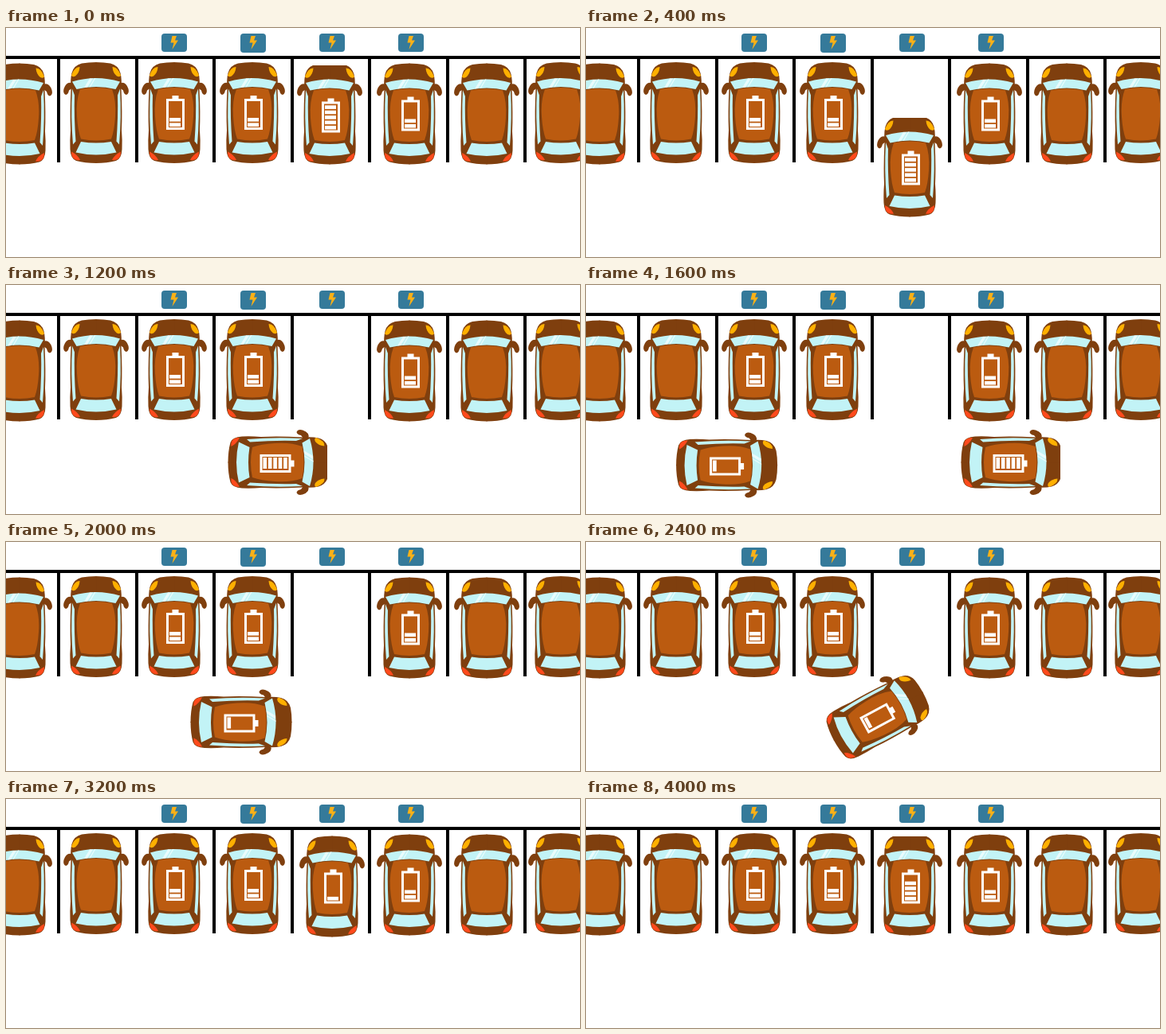
An HTML page with a canvas for the animation above (4.2 s loop, 720x288 px).

```html
<!DOCTYPE html>
<html lang="en">
<head>
<meta charset="utf-8">
<title>Charging bay</title>
<style>
html, body { margin: 0; width: 100%; height: 100%; overflow: hidden; background: #fff; }
canvas { display: block; }
</style>
</head>
<body>
<canvas id="stage" width="720" height="288"></canvas>
<script>
const ctx = document.getElementById('stage').getContext('2d');
const STEP = 200, STEPS = 21;
const DARK = '#7f3f0e', ROOF = '#bb5b10', GLASS = '#c2f3f6';
const path = d => new Path2D(d);

// Car parts around the car's centre, front pointing up
const roof = path('M-20-29.5Q0-33.5 20-29.5Q25.5-15 24 5Q23 22 19 33Q0 37-19 33Q-23 22-24 5Q-25.5-15-20-29.5Z');
const windscreen = path('M-30-39Q0-48 30-39L24.5-29.5Q0-35.5-24.5-29.5Z');
const rearWindow = path('M-19 36.5Q0 39.5 19 36.5L25.5 50Q0 56-25.5 50Z');
const glare = path('M-15-31.5L-8-43H-4L-11-32ZM-8.5-32.3L-2-43.5H-.5L-7-32.5Z');

// Drawn on the right, then mirrored to the left
const sideParts = [
  [DARK, path('M-.5-63.5Q10-63.5 18-62Q28-59.5 30.5-50Q32.5-42 31.5-30Q33 0 32 22Q33 34 32.5 46Q32 58 25 60.5Q14 63.5-.5 63.5Z')],
  [DARK, path('M30-37Q37-40 40.5-30Q42-24 38-22.5Q35-23 34-28L30-31Z')],
  [GLASS, path('M30-30Q32 5 29 40L25.5 36Q27.8 5 27-22Z')],
  ['#ffb000', path('M20.5-57.5Q27-58 31-47Q30-44 26-46Q21-50 20.5-57.5Z')],
  ['#ff4a1c', path('M31 49Q31 57 26 59Q23 60 20 59.5Q23 53 31 49Z')]
];
const bolt = path('M-2.5-8.5H3L1-3H5L-2.5 8.5L-.5 0H-4.5Z');

function fill(color, shape) {
  ctx.fillStyle = color;
  ctx.fill(shape);
}

function battery(bars) {
  ctx.strokeStyle = ctx.fillStyle = '#fff';
  ctx.lineWidth = 3;
  ctx.strokeRect(-10, -16, 20, 36);
  ctx.fillRect(-4, -21.5, 8, 4.5);
  for (let i = 0; i < bars; i++) ctx.fillRect(-7.5, 12.9 - 6.4 * i, 14, 4.6);
}

function car([x, y, angle], bars = 0, flat = false) {
  ctx.save();
  ctx.translate(x, y);
  ctx.rotate(angle * Math.PI / 180);
  if (flat) {
    ctx.beginPath();
    ctx.rect(-50, -61, 100, 130);
    ctx.clip();
  }
  for (const [color, shape] of sideParts) {
    for (const side of [1, -1]) {
      ctx.save();
      ctx.scale(side, 1);
      fill(color, shape);
      ctx.restore();
    }
  }
  fill(GLASS, windscreen);
  fill(GLASS, rearWindow);
  fill('#e9fcfd', glare);
  fill(ROOF, roof);
  if (bars) {
    ctx.translate(1.5, flat ? 2 : 0);
    battery(bars);
  }
  ctx.restore();
}

// Key poses: step, [x, y, angle], power easing of each on the way there
const TURN = [2, 0.4, 1];
const leaving = [
  [0, [406, 108, 0]],
  [2, [406, 174, 0], [1, 1.8, 1]],
  [4, [384, 203, 45], TURN],
  [6, [342, 223, 90], TURN],
  [7, [421, 223, 90]],
  [9, [647, 223, 90]]
];
const arriving = [
  [7, [63, 226.5, 90]],
  [10, [295, 226.5, 90], [0.65, 1, 1]],
  [14, [400, 197.5, 15], [0.55, 2, 1.4]],
  [16, [409, 110, 0], [0.1, 1, 0.1]],
  [17, [409, 110, 0]]
];

function pose(keys, step) {
  const next = Math.max(1, keys.findIndex(([at]) => at >= step));
  const [from, a] = keys[next - 1];
  const [to, b, ease = [1, 1, 1]] = keys[next];
  const p = (step - from) / (to - from);
  return a.map((v, i) => v + (b[i] - v) * p ** ease[i]);
}

function bays() {
  ctx.fillStyle = '#000';
  ctx.fillRect(0, 35, 720, 4);
  for (let i = 0; i < 7; i++) ctx.fillRect(Math.round(64 + 97.5 * i), 35, 4, 134);
  for (let i = 0; i < 4; i++) {
    ctx.save();
    ctx.translate(211 + 99 * i, 18.5);
    ctx.beginPath();
    ctx.roundRect(-16, -11.5, 32, i === 1 ? 24 : 23, 4);
    fill('#357a9a', path(''));
    ctx.fill();
    fill('#fbb117', bolt);
    ctx.restore();
  }
}

function parkedRow(y, ...xs) {
  for (const x of xs) car([x, y, 0], x > 200 && x < 520 ? 2 : 0);
}

function draw(now) {
  const step = Math.floor(now / STEP) % STEPS;
  ctx.fillStyle = '#fff';
  ctx.fillRect(0, 0, 720, 288);
  bays();
  parkedRow(106.5, 113, 211, 309, 696);
  parkedRow(108, 17, 506, 603);
  if (step <= 9) car(pose(leaving, step), 5, true);
  if (step >= 18) car(pose(leaving, 0), step - 16, true);
  else if (step >= 7) car(pose(arriving, step), 1);
}

const start = performance.now();
function tick() {
  draw(performance.now() - start);
  requestAnimationFrame(tick);
}
tick();
</script>
</body>
</html>
```
